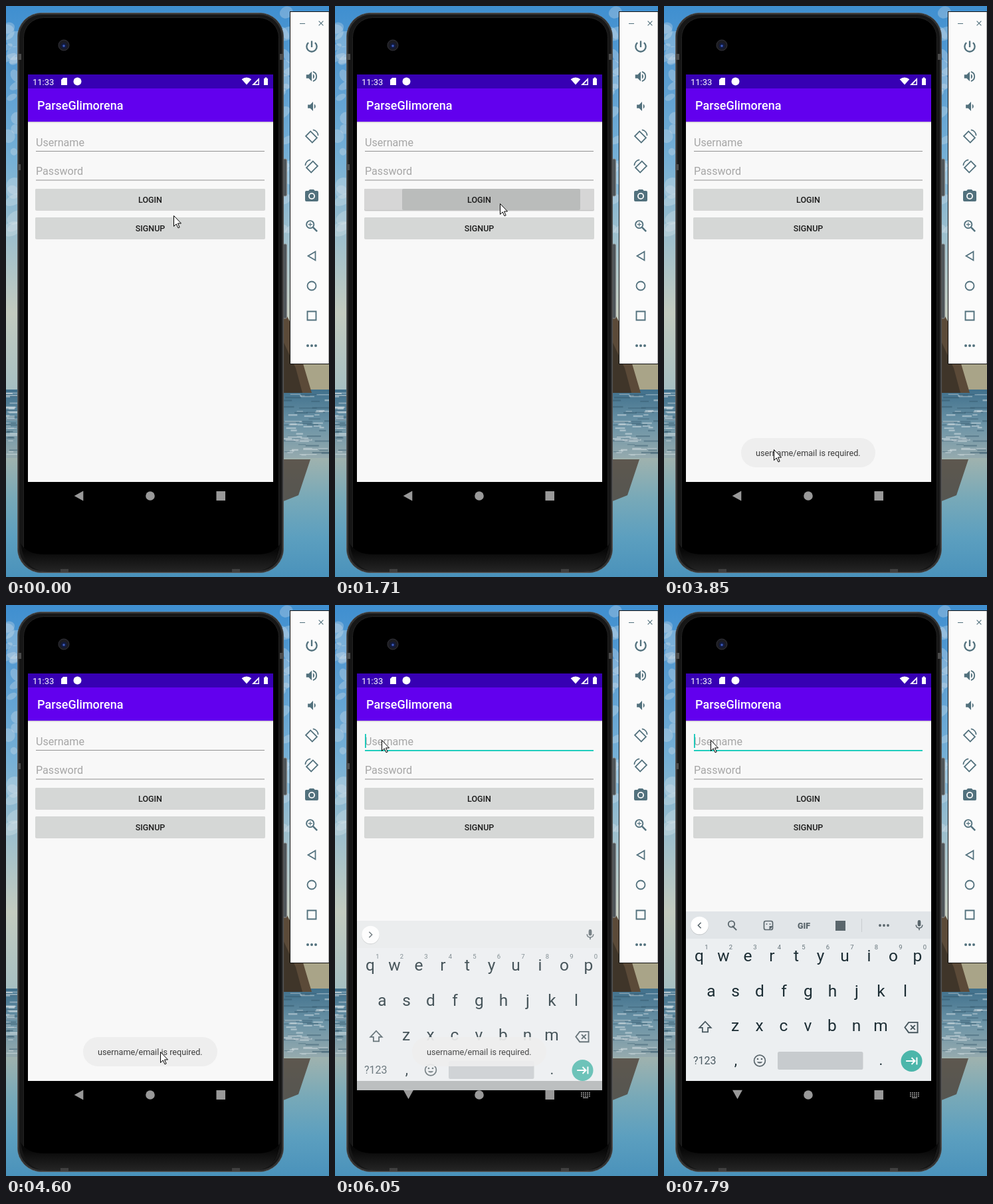
Write an HTML page with a canvas that moves like this. It is 486 by 859 pixels and loops after 8 s.

```html
<!DOCTYPE html>
<html lang="en">
<head>
<meta charset="utf-8">
<title>Login form demo</title>
<style>
html, body { margin: 0; width: 100%; height: 100%; overflow: hidden; background: #000; }
canvas { display: block; width: 486px; height: 859px; }
</style>
</head>
<body>
<canvas id="stage" width="486" height="859"></canvas>
<script>
const W = 486, H = 859, LOOP = 8000, STEP = 120;
const stage = document.getElementById('stage').getContext('2d');
let c = stage;

function layer(paint) {
  const cv = document.createElement('canvas');
  cv.width = W; cv.height = H;
  const before = c;
  c = cv.getContext('2d');
  paint();
  c = before;
  return cv;
}

// Drawing helpers
function rect(x, y, w, h, fill) { c.fillStyle = fill; c.fillRect(x, y, w, h); }
function finish(fill, line, width) {
  if (fill) { c.fillStyle = fill; c.fill(); }
  if (line) { c.strokeStyle = line; c.lineWidth = width; c.stroke(); }
}
function round(x, y, w, h, r, fill, line, width = 1) {
  c.beginPath(); c.roundRect(x, y, w, h, r); finish(fill, line, width);
}
function disc(x, y, r, fill, line, width = 1) {
  c.beginPath(); c.arc(x, y, r, 0, 7); finish(fill, line, width);
}
function poly(fill, ...p) {
  c.beginPath();
  for (let i = 0; i < p.length; i += 2) c.lineTo(p[i], p[i + 1]);
  c.closePath(); finish(fill);
}
// Regular triangle-like arrowhead pointing along `turn`
function triangle(x, y, r, turn, fill) {
  c.save(); c.translate(x, y); c.rotate(turn);
  poly(fill, -r, -r * 1.1, r, 0, -r, r * 1.1);
  c.restore();
}
function text(s, x, y, size, color, weight = 400, align = 'left') {
  c.font = `${weight} ${size}px Roboto, sans-serif`;
  c.textAlign = align; c.fillStyle = color;
  c.fillText(s, x, y);
}
// Icons live on a 24-unit grid centred on x, y
function icon(d, x, y, size, color, width = 0, turn = 0) {
  c.save();
  c.translate(x, y); c.rotate(turn); c.scale(size / 24, size / 24); c.translate(-12, -12);
  const p = new Path2D(d);
  if (width) { c.strokeStyle = color; c.lineWidth = width; c.stroke(p); }
  else { c.fillStyle = color; c.fill(p); }
  c.restore();
}
function dots(x, y, gap, r, color) { for (let i = -1; i < 2; i++) disc(x + i * gap, y, r, color); }
function fade(y0, y1, ...colors) {
  const g = c.createLinearGradient(0, y0, 0, y1);
  colors.forEach((col, i) => g.addColorStop(i / (colors.length - 1), col));
  return g;
}
function random(seed) { return () => (seed = (seed * 16807) % 2147483647) / 2147483647; }

const HORIZON = 577, SHORE = 680;
function paintBeach() {
  const rnd = random(77);
  rect(0, 0, W, HORIZON, fade(0, HORIZON, '#3f8fd0', '#5d9fd2', '#76b0d6', '#9dbfcd', '#c3cbbf', '#a6bfc2'));
  rect(418, 530, 68, HORIZON - 530, '#a9a488');
  for (let i = 0; i < 40; i++) {
    c.beginPath();
    c.ellipse(rnd() < .5 ? rnd() * 18 : 410 + rnd() * 20, rnd() * 340, 5 + rnd() * 10, 4 + rnd() * 9, -.5, 0, 7);
    finish('rgba(222,230,234,.3)');
  }
  rect(0, HORIZON, W, SHORE - HORIZON, fade(HORIZON, SHORE, '#40708c', '#6b93a6', '#95aaae'));
  rect(0, SHORE, W, H - SHORE, fade(SHORE, H, '#9fb2ae', '#78a9b8', '#5c9fbf', '#4a92bb'));
  for (let i = 0; i < 110; i++) {
    rect(rnd() < .4 ? rnd() * 14 - 8 : 410 + rnd() * 70, HORIZON + 4 + rnd() * 96, 6 + rnd() * 22, 1 + rnd() * 1.5,
      rnd() < .55 ? 'rgba(230,238,240,.45)' : 'rgba(50,85,105,.45)');
  }
  poly('#5b4a38', 415, 452, 430, 480, 449, 545, 460, 582, 415, 582);
  poly('#3f3529', 415, 500, 436, 545, 446, 582, 415, 582);
  poly('rgba(78,66,56,.8)', 415, 682, 458, 682, 440, 736, 415, 746);
}

function speaker(x, y) {
  round(x, y, 153, 9, 4, '#252523', '#3c3c38');
  for (let i = 0; i < 72; i++) rect(x + 5 + i * 2, y + 2 + (i % 2) * 3, 2, 2, '#10100f');
}

function paintPhone() {
  for (const [y, h] of [[230, 56], [358, 112]]) round(417, y, 5.5, h, 2, '#50565a', '#8f9394');
  round(17.5, 10.5, 400, 842, 36, '#161616', '#5a5a5a');
  round(19, 12, 397, 839, 35, null, '#333', 2);
  round(26.5, 17.5, 384, 830, 30, '#000', '#222');
  c.beginPath();
  c.moveTo(22, 808); c.quadraticCurveTo(31, 826, 62, 825);
  c.lineTo(374, 825); c.quadraticCurveTo(404, 826, 413, 808);
  c.quadraticCurveTo(407, 851, 372, 851);
  c.lineTo(62, 851); c.quadraticCurveTo(27, 850, 22, 808);
  finish(fade(820, 852, '#080808', '#262626'));
  for (const x of [17, 412]) rect(x, 72, 6, 9, '#4c4c4c');
  for (const x of [82, 340]) rect(x, 847, 12, 5, '#404040');
  rect(17, 238, 5, 9, '#4c4c4c');
  disc(87, 59, 8, '#1c1c22', '#33333a');
  disc(87, 60, 4.5, '#121a3c');
  disc(87, 60, 1.8, '#3d5cc0');
}

const SPEAKER = 'M3 9v6h4l5 5V4L7 9zM14 8a4.5 4.5 0 0 1 0 8z';
function paintToolbar() {
  const ink = '#52717d', paper = '#fbfbfb', x = 460;
  const slot = i => 61 + i * 45;
  rect(427, 8, 59, 531, '#111');
  rect(428, 9, 57, 529, paper);
  rect(485, 9, 1, 529, '#aaa');
  rect(442, 26, 8, 1, ink);
  icon('M3 3L21 21M21 3L3 21', 474, 26, 9, ink, 3);
  icon('M12 3V13M17.1 5.9A8 8 0 1 1 6.9 5.9', x, slot(0), 23, ink, 2.4);
  icon(SPEAKER, x, slot(1), 22, ink);
  icon('M14 4.3a8 8 0 0 1 0 15.4', x, slot(1), 22, ink, 2);
  icon(SPEAKER, x + 2, slot(2), 21, ink);
  [1, -1].forEach((side, i) => {
    c.save(); c.translate(x, slot(3 + i)); c.scale(side, 1);
    icon('M6.5 4.5h11v15h-11z', -.5, 1, 22, ink, 2, -Math.PI / 4);
    icon('M14 1.5A9.5 9.5 0 0 1 22.5 11', 0, 0, 22, ink, 1.8);
    c.restore();
  });
  icon('M9 2L7.2 4H4a2 2 0 0 0-2 2v12a2 2 0 0 0 2 2h16a2 2 0 0 0 2-2V6a2 2 0 0 0-2-2h-3.2L15 2z', x, slot(5), 24, ink);
  disc(x, slot(5), 5, paper); disc(x, slot(5), 3.2, ink);
  disc(x - 2.3, slot(6) - 2.3, 5.6, null, ink, 1.9);
  icon('M14 14L20.5 20.5', x, slot(6), 23, ink, 2.6);
  icon('M6.5 9.5h6.4M9.7 6.3v6.4', x, slot(6), 23, ink, 1.2);
  icon('M18 5V19L6 12z', x, slot(7), 22, ink, 1.9);
  disc(x, slot(8), 6.5, null, ink, 1.8);
  icon('M5.5 5.5h13v13h-13z', x, slot(9), 24, ink, 1.9);
  dots(x, slot(10), 6, 2, ink);
}

function label(s, y) { text(s, 217, y + 21, 12.5, '#1c1c1c', 500, 'center'); }
function button(y, s) {
  round(44, y, 346, 33, 2, 'rgba(0,0,0,.14)');
  round(44, y, 346, 32, 2, '#d5d7d6');
  label(s, y);
}

function paintApp() {
  rect(33, 103, 369, 613, '#f8f8f8');
  rect(33, 103, 369, 21, '#3700b3');
  rect(33, 124, 369, 50, '#6200ee');
  rect(33, 174, 369, 2, fade(174, 176, '#c6c2cc', '#eeeeef'));
  text('11:33', 40, 118.5, 13, '#fff');
  poly('#fff', 86, 108, 92, 108, 92, 119, 83, 119, 83, 111);
  disc(107.5, 113.5, 6, '#fff');
  c.beginPath(); c.moveTo(362, 118.5); c.arc(362, 118.5, 11, -2.3, -.85); finish('#fff');
  poly('#fff', 381, 108, 381, 119, 370, 119);
  poly('#3700b3', 379.5, 112, 379.5, 117.5, 374.5, 117.5);
  rect(388, 109, 6, 10, '#fff'); rect(389.5, 107.5, 3, 2, '#fff');
  text('ParseGlimorena', 47, 156, 18, '#fff', 500);
  ['Username', 'Password'].forEach((hint, i) => {
    text(hint, 45, 211 + i * 43, 16.1, '#a6a6a6');
    rect(45, 218 + i * 43.5, 344, 1, '#929292');
  });
  button(275, 'LOGIN'); button(318, 'SIGNUP');
  disc(217, 737, 6.8, '#999');
  rect(316.5, 730, 13.5, 14, '#999');
}

const MIC = 'M9 5a3 3 0 0 1 6 0v6a3 3 0 0 1-6 0zM5 11h2a5 5 0 0 0 10 0h2a7 7 0 0 1-6 6.9V21h-2v-3.1A7 7 0 0 1 5 11z';
function paintKeyboard(open) {
  const ink = '#1c2d34', soft = '#5a666c', mid = '#46565d', y = 482;
  rect(33, 461, 369, 255, '#eceff1');
  rect(33, 461, 369, 41, open ? '#e1e5e8' : '#e8ebec');
  disc(53.5, y + 1, 13.5, 'rgba(0,0,0,.12)');
  disc(53.5, y, 13.3, '#fff');
  icon('M9 6L15 12L9 18', 53.5, y, 17, soft, 2.3, open ? Math.PI : 0);
  icon(MIC, 384, y, 19, soft);
  if (open) {
    disc(101.5, y - 2, 4.7, null, soft, 1.8);
    icon('M13 13L21 21', 102, y, 19, soft, 2.6);
    round(150.5, y - 6.5, 13, 13, 2.5, null, soft, 1.7);
    poly(soft, 164, y + 1, 158.5, y + 7, 158.5, y + 1);
    for (const x of [154.5, 159.5]) disc(x, y - 2, 1, soft);
    text('GIF', 210.5, y + 4.5, 12.5, soft, 900, 'center');
    rect(258, y - 7, 15, 15, soft);
    rect(297, y - 10, 1, 20, '#c8cdd0');
    dots(331, y, 6, 1.9, soft);
  }
  const row = (keys, x, base, size, color) => [...keys].forEach((k, i) =>
    text(k, x + i * 36.5, base, size, color, 400, 'center'));
  ['qwertyuiop', 'asdfghjkl', 'zxcvbnm'].forEach((keys, i) =>
    row(keys, 53 + i * 18 + (i > 1 ? 18 : 0), 536 + i * 52.7, 24.5, ink));
  row('1234567890', 64, 518, 9.5, '#66747b');
  icon('M12 3L21.5 13H16.5V20H7.5V13H2.5z', 62, 635, 22, mid, 1.9);
  icon('M8 4H22V20H8L2 12zM11 8.5L18 15.5M18 8.5L11 15.5', 372, 635.5, 23, mid, 2);
  text('?123', 44, 691, 16, '#4b5a62');
  text(',', 108, 692, 22, ink, 400, 'center');
  text('.', 326.5, 692, 22, ink, 400, 'center');
  disc(144, 685.5, 8.4, null, soft, 1.7);
  for (const x of [141, 147]) disc(x, 683, 1.3, soft);
  icon('M7 14a5.4 4.6 0 0 0 10 0z', 144, 685.5, 20, soft);
  round(171, 672, 128.5, 27, 2.5, '#c7cbce');
  disc(372.5, 686, 16, '#4bb6aa');
  icon('M2 12H18M12 6L18 12L12 18M21.5 5.5V18.5', 372.5, 686, 20, '#fff', 2.4);
}

function paintToast() {
  round(116, 650, 202, 44, 22, '#eee');
  text('username/email is required.', 138, 677, 12.67, '#3b3b3b');
}

const base = layer(() => { paintBeach(); paintPhone(); paintToolbar(); paintApp(); });
const keysOpening = layer(() => paintKeyboard(false));
const keysOpen = layer(() => paintKeyboard(true));
const toast = layer(paintToast);

// Motion advances in held steps: progress 0..1 over `steps` jumps
function ramp(t, from, steps) {
  return t < from ? 0 : Math.min(1, (Math.floor((t - from) / STEP) + 1) / steps);
}
const easeOut = p => 1 - (1 - p) ** 2;
const mix = (a, b, p) => a + (b - a) * p;

const PRESS = 1710, FOCUS = 5660, OPENING = 6050, OPEN = 6170, BLINK = 530;
// Pointer legs: start time, steps, destination
const LEGS = [
  [150, 3, 248, 297], [2700, 1, 195, 487], [2850, 3, 200, 645], [3850, 3, 137, 685],
  [4240, 2, 292, 681], [4480, 2, 232, 672], [4750, 4, 68, 212], [5260, 1, 70, 203]];

function pointerAt(t) {
  let x = 252, y = 315;
  for (const [from, steps, toX, toY] of LEGS) {
    const p = easeOut(ramp(t, from, steps));
    x = mix(x, toX, p); y = mix(y, toY, p);
  }
  return [Math.round(x), Math.round(y)];
}

function faded(alpha, paint) { c.globalAlpha = alpha; paint(); c.globalAlpha = 1; }

function drawPointer(x, y) {
  c.save();
  c.translate(x + .5, y + .5);
  poly('#fff', 0, 0, 0, 16, 3.7, 12.4, 6.5, 18.4, 8.7, 17.4, 6, 11.5, 11, 11.5);
  finish(null, '#000', 1);
  c.restore();
}

function drawRipple(t) {
  const grow = ramp(t, PRESS, 2), press = 1 - ramp(t, PRESS + STEP, 3);
  if (!grow || !press) return;
  const left = mix(158, 44, grow), right = mix(348, 390, grow);
  round(44, 275, 346, 34, 2, `rgba(0,0,0,${.08 * press})`);
  round(44, 275, 346, 32, 2, '#d6d6d6');
  faded(press, () => round(left, 275, right - left, 32, 2, '#babcbb'));
  label('LOGIN', 275);
}

function drawKeyboard(t) {
  triangle(t < OPENING ? 109.5 : 110.5, t < OPENING ? 737 : 736.5, 6.8, t < OPENING ? Math.PI : Math.PI / 2, '#999');
  if (t < OPENING) return;
  for (let i = 0; i < 15; i++)
    rect(370 + (i % 5) * 3, 733 + Math.floor(i / 5) * 2.6, 1.8, 1.6, '#999');
  rect(373, 740.6, 8, 1.4, '#999');
  if (t < OPEN) faded(.8, () => c.drawImage(keysOpening, 0, 14));
  else c.drawImage(keysOpen, 0, 0);
}

function draw(t) {
  c.drawImage(base, 0, 0);
  drawRipple(t);
  if (t >= FOCUS) {
    rect(45, 218, 344, 2, '#20cdbd');
    if (Math.floor((t - FOCUS) / BLINK) % 2 === 0) rect(45, 194, 1.8, 21, '#10c8b8');
  }
  drawKeyboard(t);
  const shown = ramp(t, 3210, 4) * (1 - ramp(t, 6530, 4));
  if (shown) faded(shown * (t < OPENING ? 1 : .92), () => c.drawImage(toast, 0, 0));
  drawPointer(...pointerAt(t));
}

const start = performance.now();
function tick() {
  draw((performance.now() - start) % LOOP);
  requestAnimationFrame(tick);
}
tick();
</script>
</body>
</html>
```
